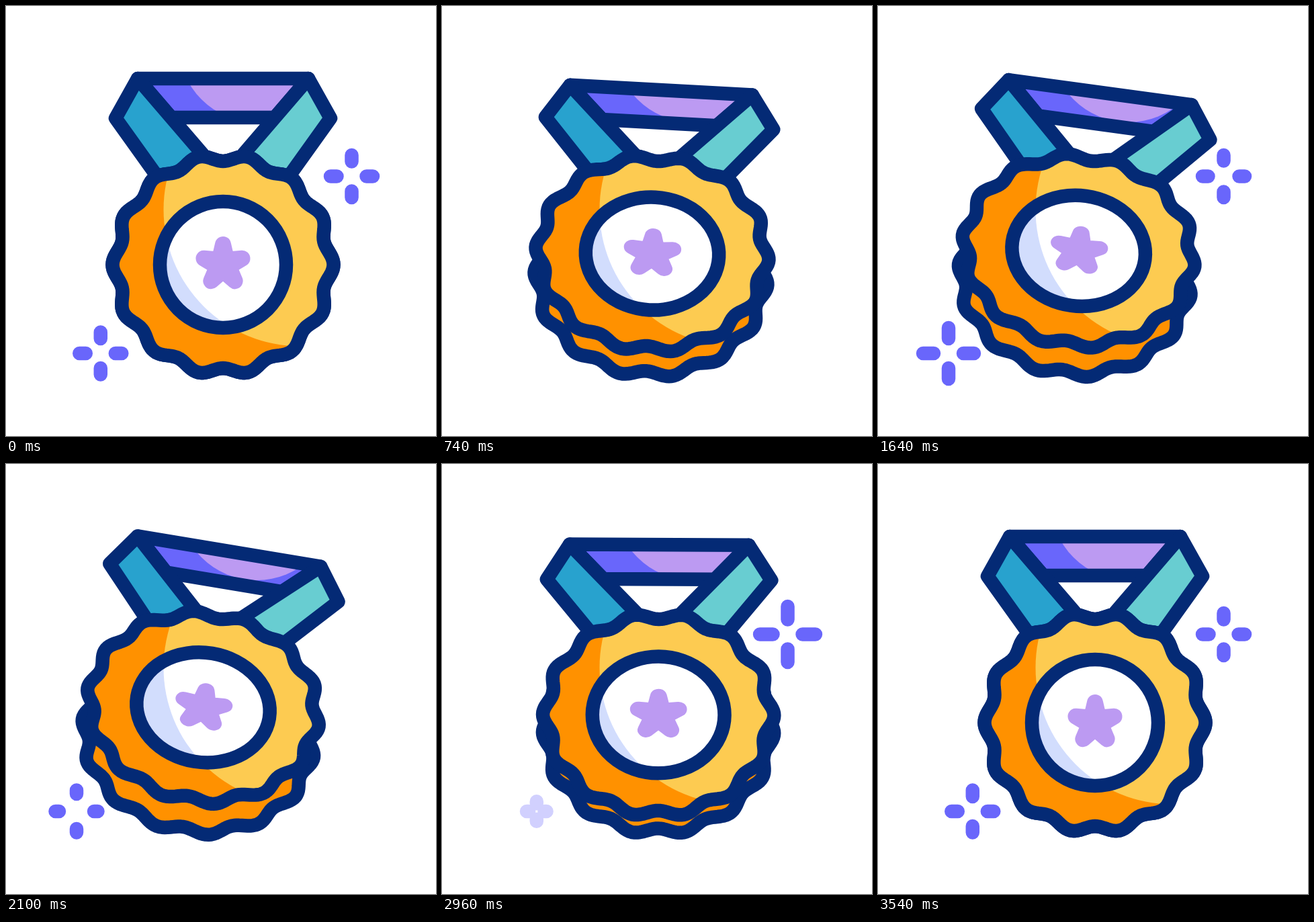
An HTML page with a canvas that plays this animation: 640 px wide and 640 px high, repeating every 3.6 s.

```html
<!DOCTYPE html>
<html lang="en">
<head>
<meta charset="utf-8">
<title>Medal</title>
<style>
  html, body { margin: 0; width: 100%; height: 100%; overflow: hidden; background: #fff; }
  canvas { display: block; }
</style>
</head>
<body>
<canvas id="stage" width="640" height="640"></canvas>
<script>
const ctx = document.getElementById('stage').getContext('2d');
const LOOP = 3600;
const PIVOT = { x: 323, y: 185 };
const NAVY = '#042a75', PURPLE = '#6966fb', LILAC = '#bc9af2', ORANGE = '#ff9100',
      YELLOW = '#fdcb51', SKY = '#d2ddfd', TEAL = '#28a2ce', AQUA = '#68cdd1';

// Highlights stay fixed on the stage while the medal swings.
const MEDAL_LIGHT = [438, 303, 203.5];
const BAR_LIGHT = [373, 57, 116];

// [time, value] keys: swing in degrees, tilt as a fraction
const SWING = [[100, 0], [560, 2.2], [740, 3.12], [1180, 5.35], [1700, 8], [2100, 9.44],
               [2240, 9.7], [2570, -5.05], [2960, .25], [3340, .6], [3540, 0]];
const TILT = [[100, 0], [560, .76], [740, .8], [1180, .877], [2100, 1], [2240, 1.02],
              [2570, 0], [2960, .57], [3100, .6], [3340, .45], [3540, 0]];

const clamp = v => Math.min(1, Math.max(0, v));
const smooth = v => { v = clamp(v); return v * v * (3 - 2 * v); };

// Monotone cubic interpolation through the keys
function valueAt(keys, t) {
  const last = keys.length - 1;
  if (t <= keys[0][0]) return keys[0][1];
  if (t >= keys[last][0]) return keys[last][1];
  const slope = i => (keys[i + 1][1] - keys[i][1]) / (keys[i + 1][0] - keys[i][0]);
  const tangent = i => {
    if (i === 0 || i === last) return 0;
    const a = slope(i - 1), b = slope(i);
    return a * b <= 0 ? 0 : 2 * a * b / (a + b);
  };
  const i = keys.findIndex(k => k[0] > t) - 1;
  const span = keys[i + 1][0] - keys[i][0], x = (t - keys[i][0]) / span, s = smooth(x);
  return keys[i][1] * (1 - s) + keys[i + 1][1] * s
    + span * x * (1 - x) * ((1 - x) * tangent(i) - x * tangent(i + 1));
}

function polygon(points) {
  const path = new Path2D();
  points.forEach(([x, y]) => path.lineTo(x, y));
  path.closePath();
  return path;
}

function radial(count, radius, cy, sx, sy) {
  return polygon(Array.from({ length: count }, (_, i) => {
    const a = i / count * 2 * Math.PI, r = radius(a, i);
    return [r * Math.sin(a) * sx, cy - r * Math.cos(a) * sy];
  }));
}

function outlined(path, fill, light, spot) {
  ctx.fillStyle = fill;
  ctx.fill(path);
  if (light) {
    ctx.save();
    ctx.clip(path);
    ctx.resetTransform();
    ctx.fillStyle = light;
    ctx.beginPath();
    ctx.arc(...spot, 0, 2 * Math.PI);
    ctx.fill();
    ctx.restore();
  }
  ctx.strokeStyle = NAVY;
  ctx.lineWidth = 20.5;
  ctx.stroke(path);
}

function drawRibbon(tilt) {
  const top = [127 + 11 * tilt, -77 + 21.3 * tilt];
  const corner = [160 + 12.5 * tilt, -18 + 9.5 * tilt];
  const outerEnd = [92 + 7 * tilt, 77 - 7 * tilt];
  const innerEnd = [23 + 6 * tilt, 44];
  const low = -19 + 9.6 * tilt;
  const k = (low - top[1]) / (innerEnd[1] - top[1]);
  const bottom = [top[0] + (innerEnd[0] - top[0]) * k, low];
  const mirror = ([x, y]) => [-x, y];
  const strap = [top, corner, outerEnd, innerEnd];

  outlined(polygon([mirror(top), top, bottom, mirror(bottom)]), PURPLE, LILAC, BAR_LIGHT);
  outlined(polygon(strap.map(mirror)), TEAL);
  outlined(polygon(strap), AQUA);
}

function drawMedal(tilt) {
  const cy = 200 - 20.2 * tilt;
  const sx = 1 + .11 * tilt - .05 * tilt * tilt, sy = 1 - .133 * tilt;
  const scallop = a => 159.3 - 5.2 * Math.cos(14 * a);
  const disc = y => radial(280, scallop, y, sx, sy);

  outlined(disc(cy + 46.5 * tilt), ORANGE);
  outlined(disc(cy), ORANGE, YELLOW, MEDAL_LIGHT);

  const ring = new Path2D();
  ring.ellipse(0, cy, 94 * sx, 94 * sy, 0, 0, 2 * Math.PI);
  outlined(ring, SKY, '#fff', MEDAL_LIGHT);

  ctx.save();
  ctx.translate(0, cy);
  ctx.scale(sx, sy);
  const star = radial(10, (a, i) => i % 2 ? 9 : 30, 0, 1, 1);
  ctx.fillStyle = ctx.strokeStyle = LILAC;
  ctx.lineWidth = 24;
  ctx.fill(star);
  ctx.stroke(star);
  ctx.restore();
}

// Arms burst outwards, settle, then retract towards their tips.
function drawSparkle(x, y, t, start, trimStart, end) {
  if (t < start || t >= end) return;
  const age = t - start;
  const grow = clamp(age / 270) ** 1.12;
  const outer = 10.5 + 31 * grow - 10 * smooth((age - 270) / 140);
  let inner = 10 + 12 * grow;
  inner += (outer - inner) * clamp((t - trimStart) / (end - trimStart));
  ctx.globalAlpha = clamp(age / 150);
  ctx.strokeStyle = PURPLE;
  ctx.lineWidth = 20.5;
  ctx.beginPath();
  for (const [dx, dy] of [[1, 0], [0, 1], [-1, 0], [0, -1]]) {
    ctx.moveTo(x + dx * inner, y + dy * inner);
    ctx.lineTo(x + dx * outer, y + dy * outer);
  }
  ctx.stroke();
  ctx.globalAlpha = 1;
}

function draw(t) {
  ctx.resetTransform();
  ctx.clearRect(0, 0, 640, 640);
  ctx.lineJoin = ctx.lineCap = 'round';

  for (const time of [t, t + LOOP]) {
    drawSparkle(514.5, 253.5, time, 1090, 1590, 2080);
    drawSparkle(514.5, 253.5, time, 2685, 3700, 4200);
    drawSparkle(105, 517, time, 1315, 1890, 2390);
    drawSparkle(140.8, 517, time, 2915, 3720, 4260);
  }

  const tilt = valueAt(TILT, t);
  ctx.translate(PIVOT.x, PIVOT.y);
  ctx.rotate(valueAt(SWING, t) * Math.PI / 180);
  drawRibbon(tilt);
  drawMedal(tilt);
}

const begin = performance.now();
function frame() {
  draw((performance.now() - begin) % LOOP);
  requestAnimationFrame(frame);
}
frame();
</script>
</body>
</html>
```
